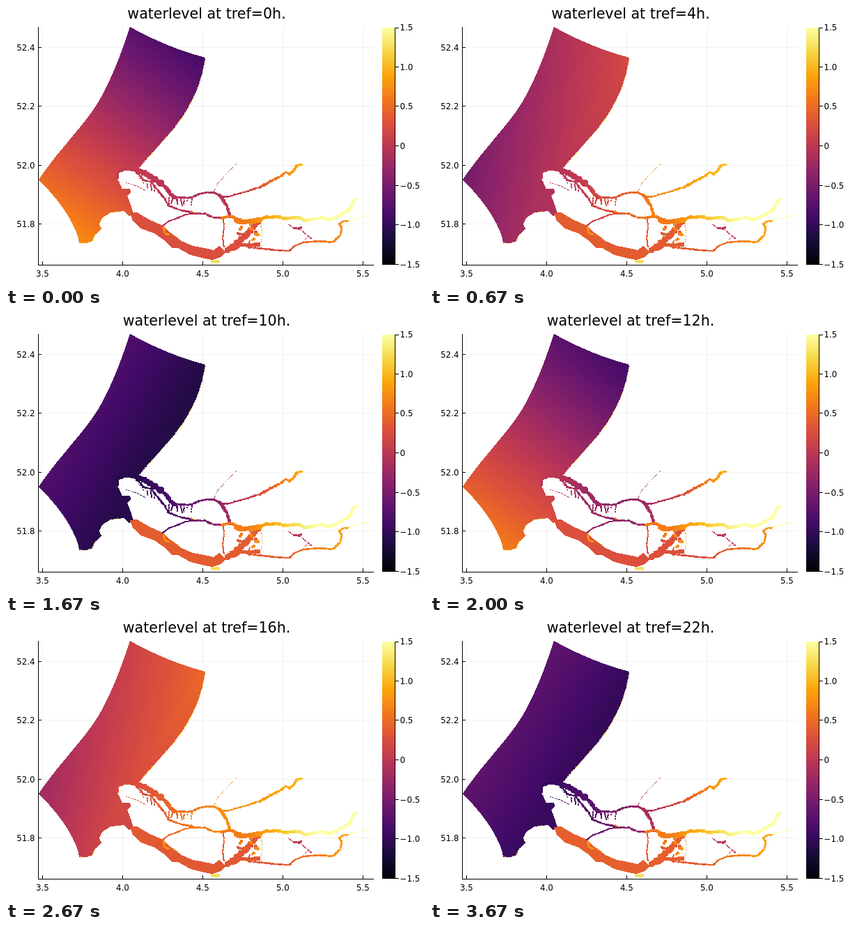
Recreate the animation shown at these times as an HTML page with a canvas. Size 600 px wide and 400 px high, loop 4010 ms.

```html
<!DOCTYPE html>
<html lang="en">
<head>
<meta charset="utf-8">
<title>waterlevel</title>
<style>
html, body { margin: 0; width: 100%; height: 100%; overflow: hidden; background: #fff; }
svg, canvas { position: absolute; left: 0; top: 0; width: 600px; height: 400px; display: block; }
canvas { image-rendering: pixelated; }
text { font-family: "DejaVu Sans", sans-serif; font-size: 11.8px; fill: #000; }
#title { font-size: 20.6px; text-anchor: middle; }
</style>
</head>
<body>
<svg viewBox="0 0 600 400">
  <defs><linearGradient id="bar" x1="0" y1="1" x2="0" y2="0"></linearGradient></defs>
  <path id="grid" fill="none" stroke="#f2f2f2" shape-rendering="crispEdges"/>
  <path id="axes" fill="none" stroke="#000" shape-rendering="crispEdges"/>
  <rect x="540" y="31" width="18" height="340" fill="url(#bar)"/>
  <text id="title" x="288" y="18.3"></text>
  <g id="labels"></g>
</svg>
<canvas id="map" width="600" height="400"></canvas>
<script>
const W = 600, H = 400, LOOP = 4010, STEPS = 12, TIDE = 12.42;
const NS = "http://www.w3.org/2000/svg";
const $ = id => document.getElementById(id);

let seed = 7;
const rand = () => (seed = (seed * 16807) % 2147483647) / 2147483647;
const between = (a, b) => a + (b - a) * rand();

// Inferno colour scale, -1.5 to 1.5
const hex = "000004 160b39 420a68 6a176e 932667 bc3754 dd513a f37819 fca50a f6d746 fcffa4".split(" ");
const stops = hex.map(h => [0, 2, 4].map(i => parseInt(h.substr(i, 2), 16)));
function color(level) {
  const p = Math.min(1, Math.max(0, (level + 1.5) / 3)) * 10;
  const i = Math.min(9, Math.floor(p));
  return stops[i].map((c, k) => c + (stops[i + 1][k] - c) * (p - i));
}

// One tidal cycle: key hours, and the level there at each corner of the sea
const hours = [0, 1.6, 4, 5.8, 9.8, TIDE];
const corners = {
  west: [.5, .58, -.4, -1.15, -.74],
  south: [.75, .92, -.1, -1.36, -1.02],
  north: [-.72, .38, 0, -.4, -.76],
  east: [-.9, .8, .32, -.4, -1.06]
};
function tide(name, t) {
  const keys = corners[name], h = ((t % TIDE) + TIDE) % TIDE;
  let i = 4;
  while (h < hours[i]) i--;
  const p = (h - hours[i]) / (hours[i + 1] - hours[i]);
  const ease = (1 - Math.cos(Math.PI * p)) / 2;
  const daily = -.13 * Math.sin(Math.PI * t / 12);
  return keys[i] + (keys[(i + 1) % 5] - keys[i]) * ease + daily;
}
const coast = t => .57 * tide("south", t) + .43 * tide("east", t);

// Bilinear in sheared coordinates: p runs up the coast, q towards land
function sea(t) {
  const [w, s, n, e] = ["west", "south", "north", "east"].map(c => tide(c, t));
  return (x, y) => {
    const dx = x - 47, dy = y - 249;
    const a = (67 * dx - 83 * dy) / 30621, b = (156 * dy + 243 * dx) / 30621;
    const q = Math.min(1, Math.max(0, b));
    const p = Math.min(1, Math.max(0, (a + .12 * q) / (.88 + .24 * q)));
    return (w + (n - w) * p) * (1 - q) + (s + (e - s) * p) * q;
  };
}
// The tide runs upstream later and weaker while the bed rises
const north = t => x => {
  const d = Math.max(0, x - 180);
  return 1.05 * (d / 245) ** 2 + Math.max(0, 1 - d / 260) * coast(t - d / 80);
};
const south = t => x =>
  .38 + .12 * Math.cos(2 * Math.PI * (t - 7) / TIDE) + .006 * Math.max(0, x - 400);
const east = () => x => .62 + .009 * Math.max(0, x - 345);
const still = v => () => () => v;

// Outlines
const westCoast = "M47,249C78,203 116,168 137,130C153,100 164,72 178,30";
const eastCoast = "286,74C281,115 262,150 240,177Q212,208 190,234";
const island = "178,262 179,267 174,272 179,285 183,298 177,301 170,294";
const southCoast = "170,294 150,296 138,304 134,313 137,319 128,328 124,337 116,340 105,340";
const seaShape = `${westCoast}Q232,60 ${eastCoast}L163,236 158,243 167,262 ${island} ${southCoast} 104,333Q92,294 47,249Z`;
const landShape = "M163,240 171,236 184,238 187,245 184,248 190,254 181,257 182,261 166,262 168,256 160,249Z";
const estuary = "M178,297 188,296 205,306 225,315 236,325 252,337 268,344 285,347 298,350 306,344 " +
  "314,351 325,342 334,339 337,345 330,350 316,353 308,360 296,364 281,361 265,357 247,347 " +
  "239,347 229,337 213,326 194,319 182,308Z";

// Channels: width, course, share of gaps
const northRivers = [
  [7, "189,237 198,239 208,245 225,256"],
  [4.5, "224,255 231,262 236,270 243,275"],
  [3.5, "160,246 160,238 170,234 190,236"],
  [2.5, "189,239 198,250 208,252 216,262 228,276 233,286"],
  [1.3, "172,253 190,259 200,265", .2],
  [2.6, "232,285 245,291 270,297 286,298 297,303 312,304"],
  [2.6, "241,274 265,275 276,270 290,267 299,268 308,272"],
  [4, "306,271 311,278 317,286 322,303"],
  [2.3, "306,273 320,273 345,266 366,259"],
  [3.2, "364,260 388,247 395,244 401,238 407,241 413,236 417,229 425,227"],
  [1, "298,267 304,254 318,239 331,226", .5],
  [2.2, "224,316 233,309 246,304 258,299 271,297"]
];
const southRivers = [
  [2, "312,304 313,318 311,333 313,346"],
  [6.5, "362,309 353,319 342,331 329,342 316,351"],
  [5, "332,342 345,343 363,342"],
  [2.3, "335,340 349,346 390,350 407,351 414,344 426,339 453,337 466,339 474,336"],
  [2.5, "472,336 480,329 482,318 478,313 485,308 492,308"]
];
const eastRivers = [
  [3.5, "310,304 322,301 332,305"],
  [6.5, "329,306 337,310 349,309 365,307"],
  [4.2, "363,308 371,303 392,302 400,305 420,303 430,308 455,303 464,307 479,300 494,291 499,279 504,276"],
  [1.4, "492,307 501,304 516,301 528,300", .25],
  [1, "366,314 368,324 366,339", .4]
];
const closedRivers = [
  [1.4, "405,313 413,319 423,320 430,327 439,334", .15],
  [2.6, "413,318 421,319 425,317"],
  [1, "433,331 427,338", .4]
];

// Random side branches: harbour basins and marsh creeks
function basins() {
  return Array.from({ length: 13 }, (_, i) => {
    const x = i < 5 ? 190 + i * 6 : 201 + i * 5.5;
    const y = i < 5 ? 243 + i * 4 : 275;
    return [between(1, 2.4), `${x},${y} ${x + between(-3, 3)},${y + between(3, 13)}`, .1];
  });
}
function creeks(n) {
  return Array.from({ length: n }, () => {
    const x = between(335, 360), y = between(311, 341);
    return [between(1.5, 4), `${x},${y} ${x + between(-7, 6)},${y + between(-4, 7)}`, .1];
  });
}

function mask(draw) {
  const c = document.createElement("canvas");
  c.width = W; c.height = H;
  const g = c.getContext("2d", { willReadFrequently: true });
  draw(g);
  const d = g.getImageData(0, 0, W, H).data, cells = [];
  for (let i = 0; i < W * H; i++) if (d[4 * i + 3] > 115) cells.push(i);
  return cells;
}
// Stamp uneven cells along a course, for the ragged banks of a coarse grid
function trace(g, [width, course, gaps = 0]) {
  const p = document.createElementNS(NS, "path");
  p.setAttribute("d", "M" + course);
  for (let s = 0, end = p.getTotalLength(); s <= end; s += 1.3) {
    const { x, y } = p.getPointAtLength(s);
    const size = Math.max(1, Math.round(width * between(.65, 1.2)));
    if (rand() >= gaps) g.fillRect(Math.round(x - size / 2), Math.round(y - size / 2), size, size);
  }
}
const traced = list => mask(g => list.forEach(c => trace(g, c)));

const layers = [
  [mask(g => {
    g.fill(new Path2D(seaShape));
    g.globalCompositeOperation = "destination-out";
    g.fill(new Path2D(landShape));
  }), sea],
  [mask(g => g.fill(new Path2D(estuary))), south],
  [traced([...northRivers, ...basins()]), north],
  [traced([...southRivers, ...creeks(9)]), south],
  [traced([...eastRivers, ...creeks(6)]), east],
  [traced(closedRivers), still(0)],
  [traced([[3, "226,316 228,326 234,328"], [1.5, "238,327 246,332"], [1.5, "266,294 272,297"]]), still(.75)],
  [traced([[1.3, eastCoast, .4], [1.3, southCoast, .7], [4, "295,366 306,366"]]), still(1.25)]
];

const ctx = $("map").getContext("2d");
function render(step) {
  const img = ctx.createImageData(W, H);
  for (const [cells, rule] of layers) {
    const level = rule(step * 2);
    for (const i of cells) img.data.set([...color(level(i % W, Math.floor(i / W))), 255], 4 * i);
  }
  return img;
}

function label(s, x, y, anchor) {
  const t = document.createElementNS(NS, "text");
  t.setAttribute("x", x);
  t.setAttribute("y", y);
  t.setAttribute("text-anchor", anchor);
  t.textContent = s;
  $("labels").append(t);
}
function frame() {
  let grid = "", axes = "M46.5 30V371.5H528M558.5 31V371";
  for (let i = 0; i < 5; i++) {
    const x = Math.floor(52 + i * 115.2) + .5;
    grid += `M${x} 30V371`;
    axes += `M${x} 371V366`;
    label((3.5 + i / 2).toFixed(1), x, 388, "middle");
  }
  for (let i = 0; i < 4; i++) {
    const y = Math.floor(312.4 - i * 84.2) + .5;
    grid += `M47 ${y}H528`;
    axes += `M47 ${y}H51`;
    label((51.8 + i / 5).toFixed(1), 41.5, y + 4.1, "end");
  }
  for (let i = -3; i <= 3; i++) {
    const y = Math.round(201 - i * 56.7);
    axes += `M558 ${y + (i === 3 ? .5 : -.5)}H564`;
    label(i ? (i < 0 ? "\u2212" : "") + Math.abs(i / 2).toFixed(1) : "0", 565.5, y + 4, "start");
  }
  $("grid").setAttribute("d", grid);
  $("axes").setAttribute("d", axes);
  $("bar").innerHTML = hex.map((h, i) => `<stop offset="${i / 10}" stop-color="#${h}"/>`).join("");
}

const images = [];
let shown = -1;
function tick() {
  const t = performance.now() % LOOP;
  let step = STEPS - 1;
  while (step && t < Math.round(step * 100 / 3) * 10) step--;
  if (step !== shown) {
    shown = step;
    images[step] = images[step] || render(step);
    ctx.putImageData(images[step], 0, 0);
    $("title").textContent = `waterlevel at tref=${step * 2}h.`;
  }
  requestAnimationFrame(tick);
}
frame();
tick();
</script>
</body>
</html>
```
